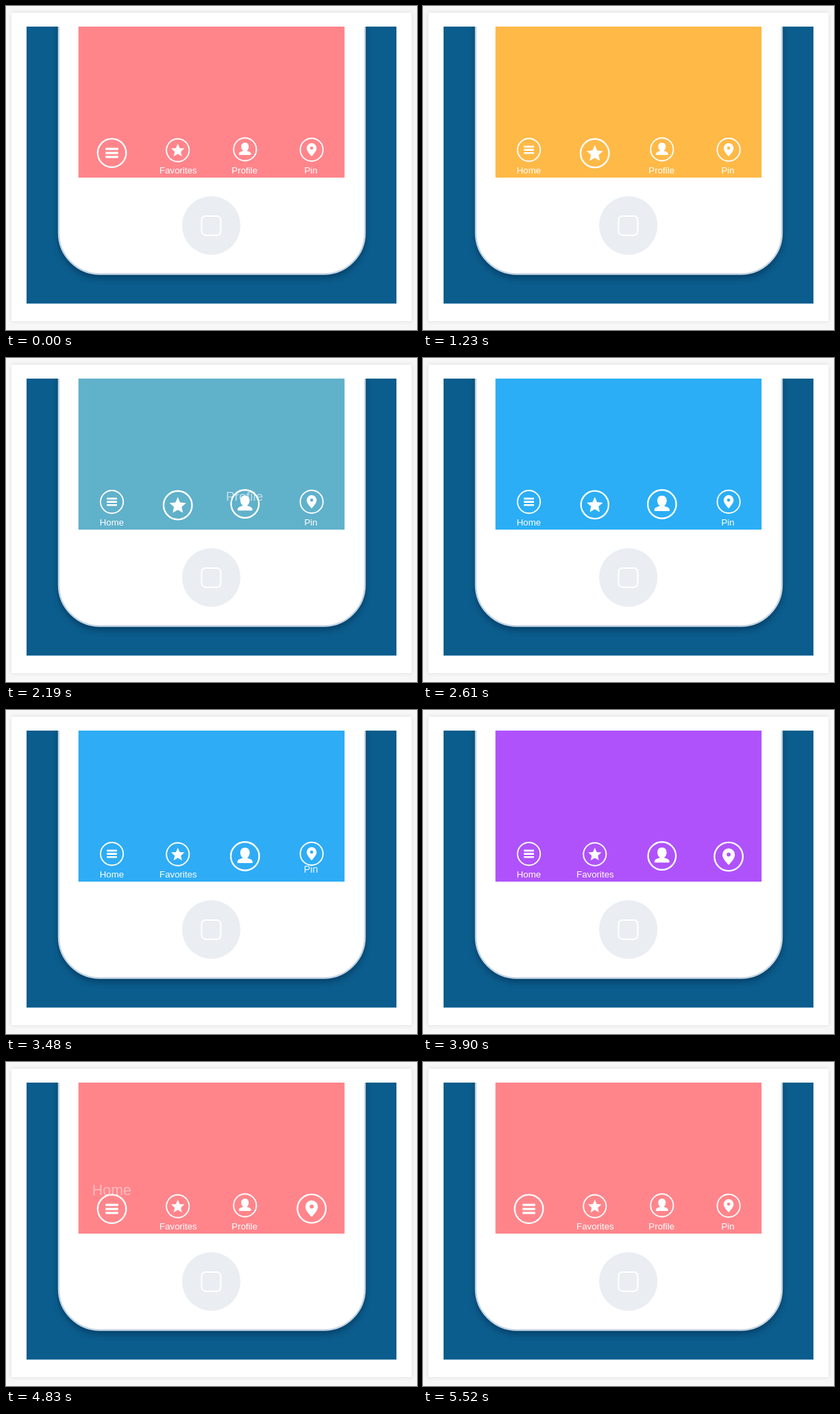
These frames come from a looping animation (600 by 472 pixels, 5880 ms). An HTML page:

```html
<!DOCTYPE html>
<html lang="en">
<head>
<meta charset="utf-8">
<title>Tab bar</title>
<style>
  html, body { margin: 0; width: 100%; height: 100%; overflow: hidden; background: #f7f7f7; }
  svg { display: block; width: 600px; height: 472px; }
  .card { filter: drop-shadow(0 0 3px rgba(0, 0, 0, .1)); }
  .phone { filter: drop-shadow(0 5px 4px rgba(0, 25, 55, .4)); }
  text { font: 13.3px "Liberation Sans", Arial, sans-serif; fill: #fff; text-anchor: middle; }
  .ring { fill: none; stroke: #fff; stroke-width: 1.9; }
  .glyph { fill: #fff; fill-rule: evenodd; }
</style>
</head>
<body>
<svg viewBox="0 0 600 472">
  <defs>
    <clipPath id="view"><rect x="105.5" y="30" width="389" height="220"/></clipPath>
    <clipPath id="stage"><rect x="30" y="30" width="540" height="403.5"/></clipPath>
  </defs>
  <rect width="600" height="472" fill="#f7f7f7"/>
  <rect class="card" x="8" y="10" width="584" height="449" fill="#fff"/>
  <rect x="30" y="30" width="540" height="403.5" fill="#0b5d8d"/>
  <g clip-path="url(#stage)">
    <rect class="phone" x="77" y="-60" width="447" height="450.5" rx="60" fill="#fff" stroke="#c6d5e3" stroke-width="2.4"/>
  </g>
  <circle cx="299.7" cy="319.7" r="42.7" fill="#eaeef2"/>
  <rect x="285.5" y="306" width="28" height="28" rx="6" fill="none" stroke="#fff" stroke-width="2"/>
  <g clip-path="url(#view)">
    <rect id="screen" x="105.5" y="30" width="389" height="220"/>
    <g id="tabs"></g>
  </g>
</svg>
<script>
const LOOP = 5880, STEP = 30;
const NS = "http://www.w3.org/2000/svg";

const bar = y => `M-6.7 ${y - 1.3}h13.4q.8 0 .8.8v1q0 .8-.8.8h-13.4q-.8 0-.8-.8v-1q0-.8.8-.8z`;
const star = Array.from({ length: 10 }, (_, i) => {
  const r = i % 2 ? 4.7 : 10.2, a = i * Math.PI / 5;
  return (r * Math.sin(a)).toFixed(2) + " " + (0.6 - r * Math.cos(a)).toFixed(2);
});
const person = "M0 -10C3.6 -10 5.5 -7.5 5.5 -4.2C5.5 -1.6 4.5 .3 2.9 1.6V2.4"
  + "C6 3 9 4 9 7.2Q9 8 8 8H-8Q-9 8 -9 7.2C-9 4 -6 3 -2.9 2.4V1.6"
  + "C-4.5 .3 -5.5 -1.6 -5.5 -4.2C-5.5 -7.5 -3.6 -10 0 -10z";
const pin = "M0 -9.6A7.3 7.3 0 0 1 7.3 -2.3C7.3 2 3.2 6.2 0 9.8C-3.2 6.2 -7.3 2 -7.3 -2.3A7.3 7.3 0 0 1 0 -9.6z"
  + "M0 -4.7a2.3 2.3 0 1 0 0 4.6a2.3 2.3 0 1 0 0 -4.6z";

// x, y: small icon centre; drop: shift when large; time spans in ms
const tabs = [
  { name: "Home", x: 154.6, y: 209.6, drop: 4.5, lx: 154.4, ly: 239, first: 1,
    glyph: [-4.7, 0, 4.7].map(bar).join(""),
    rise: [1050, 1230], fly: [4513, 5085], grow: [4540, 4720] },
  { name: "Favorites", x: 250.8, y: 210.1, drop: 4.4, lx: 251.4, ly: 239, first: 0,
    glyph: "M" + star.join("L") + "z",
    rise: [2580, 2790], fly: [520, 930], grow: [560, 740] },
  { name: "Profile", x: 348.9, y: 208.9, drop: 4.1, lx: 348.2, ly: 239.3, first: 0,
    glyph: person,
    rise: [3870, 4140], fly: [2010, 2460], grow: [2030, 2210] },
  { name: "Pin", x: 446.2, y: 209.4, drop: 4.2, lx: 445, ly: 239.2, first: 0,
    glyph: pin,
    rise: [5190, 5520], fly: [3450, 3870], grow: [3510, 3690] }
];

const pink = [255, 133, 139], orange = [255, 185, 71], blue = [43, 174, 245], purple = [175, 82, 252];
const fades = [
  [510, 900, pink, orange],
  [1920, 2280, orange, blue],
  [3470, 3860, blue, purple],
  [4410, 4770, purple, pink]
];

const clamp = v => Math.max(0, Math.min(1, v));
const ramp = (t, [a, b]) => clamp((t - a) / (b - a));
const wrap = t => (t % LOOP + LOOP) % LOOP;
const since = (t, [a, b]) => clamp(wrap(t - a) / (b - a));

function add(tag, parent, attrs) {
  const el = document.createElementNS(NS, tag);
  for (const k in attrs) el.setAttribute(k, attrs[k]);
  return parent.appendChild(el);
}

const screen = document.getElementById("screen");
const root = document.getElementById("tabs");
for (const tab of tabs) {
  tab.icon = add("g", root, {});
  add("circle", tab.icon, { class: "ring", r: 16.6 });
  add("path", tab.icon, { class: "glyph", d: tab.glyph });
  tab.label = add("text", root, { y: 4.6 });
  tab.label.textContent = tab.name;
}

function place(el, x, y, scale) {
  el.setAttribute("transform", `translate(${x} ${y}) scale(${scale})`);
}

function drawTab(tab, t) {
  const big = tab.first + ramp(t, tab.grow) - ramp(t, tab.rise);
  place(tab.icon, tab.x, tab.y + tab.drop * big, 1 + 0.25 * big);

  const { rise, fly } = tab;
  if (wrap(t - rise[0]) < wrap(fly[0] - rise[0])) {
    const q = since(t, rise);
    place(tab.label, tab.lx, tab.ly + 18 * (1 - q), 1);
    tab.label.setAttribute("opacity", q);
  } else {
    const p = since(t, fly);
    place(tab.label, tab.lx, tab.ly - 94 * p, 1 + 1.1 * p);
    tab.label.setAttribute("opacity", 1 - p);
  }
}

function colorAt(t) {
  let color = pink;
  for (const [a, b, from, to] of fades) {
    if (t < a) break;
    const k = ramp(t, [a, b]);
    color = from.map((v, i) => Math.round(v + (to[i] - v) * k));
  }
  return `rgb(${color})`;
}

function draw(t) {
  screen.setAttribute("fill", colorAt(t));
  tabs.forEach(tab => drawTab(tab, t));
}

let start;
function tick(now) {
  start ??= now;
  const t = wrap(now - start);
  draw(Math.floor(t / STEP) * STEP);
  requestAnimationFrame(tick);
}
draw(0);
requestAnimationFrame(tick);
</script>
</body>
</html>
```
